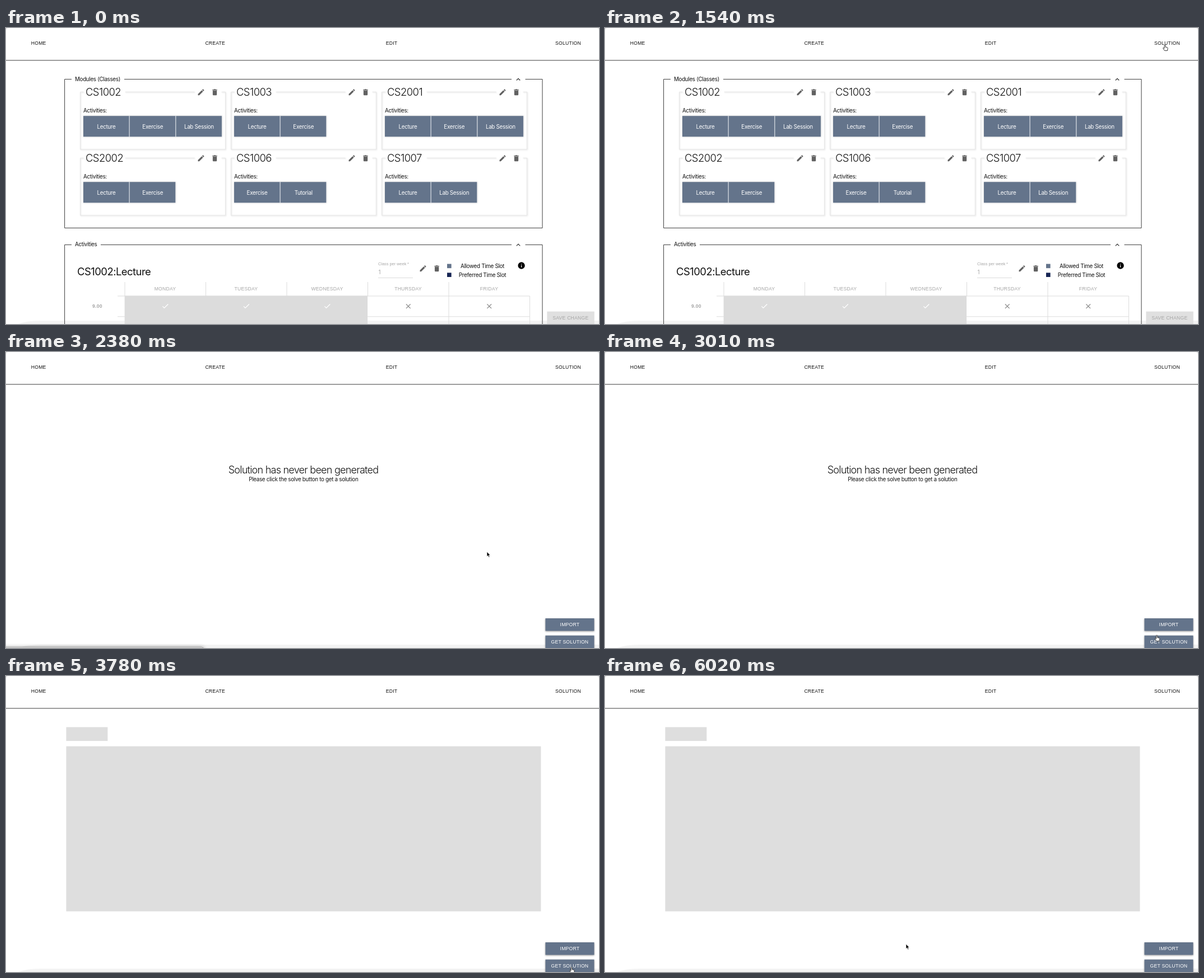
These frames come from a looping animation (1058 by 529 pixels, 8 s). An HTML page:

```html
<!DOCTYPE html>
<html lang="en">
<head>
<meta charset="utf-8">
<title>Timetable planner</title>
<style>
html, body { margin: 0; width: 100%; height: 100%; overflow: hidden; background: #fff; }
svg { display: block; width: 1058px; height: 529px; }
text { font: 9.8px Inter, sans-serif; letter-spacing: -.03em; fill: #111; }
.caps { font: 8.6px "Liberation Sans", Arial, sans-serif; letter-spacing: .0286em; }
.mid { text-anchor: middle; }
.title { font-size: 18.4px; font-weight: 300; letter-spacing: -.5px; }
.head { font-size: 18px; font-weight: 300; letter-spacing: -.75px; }
.label { font: 7.35px "Liberation Sans", Arial, sans-serif; letter-spacing: 0; }
.light { fill: #fff; }
.dim { fill: #a6a6a6; }
.line { fill: none; stroke: #3c3c3c; }
.card { fill: none; stroke: #e4e4e4; filter: drop-shadow(1px 1px 1px #0002); }
.rule { fill: none; stroke: #dcdcdc; }
.raised { filter: drop-shadow(0 1px 1.5px #0006); }
.soft { filter: drop-shadow(0 0 1.5px #0003); }

#edit, #empty, #wait, #actions, #arrow, #hand { animation: 8s step-end infinite; }
#edit { animation-name: edit; }
#empty { animation-name: empty; }
#wait { animation-name: wait; }
#actions { animation-name: actions; }
#arrow { animation-name: arrow; }
#hand { animation-name: hand; }
#status { animation: status 8s step-end infinite; filter: drop-shadow(0 0 3px #0005); }
#cursor { animation: travel 8s step-end infinite; }

@keyframes edit { 0% { opacity: 1 } 20.125%, 100% { opacity: 0 } }
@keyframes empty { 0% { opacity: 0 } 20.125% { opacity: 1 } 47.25%, 100% { opacity: 0 } }
@keyframes wait { 0% { opacity: 0 } 47.25%, 100% { opacity: 1 } }
@keyframes actions { 0% { opacity: 0 } 20.125%, 100% { opacity: 1 } }
@keyframes status {
  0% { opacity: 0 }
  20.125% { opacity: 1 }
  29.75% { opacity: 1; animation-timing-function: steps(2) }
  31.5%, 100% { opacity: 0 }
}
@keyframes arrow {
  0% { opacity: 0 }
  1.75% { opacity: 1 }
  9.625% { opacity: 0 }
  21.875% { opacity: 1 }
  36.75% { opacity: 0 }
  53.375%, 100% { opacity: 1 }
}
@keyframes hand {
  0% { opacity: 0 }
  9.625% { opacity: 1 }
  21.875% { opacity: 0 }
  36.75% { opacity: 1 }
  53.375%, 100% { opacity: 0 }
}
/* Each move runs in 70 ms ticks and rests between moves. */
@keyframes travel {
  0%, 1.75% { transform: translate(536px, 491px) }
  2.625% { transform: translate(690px, 290px) }
  3.5% { transform: translate(777px, 172px) }
  5.25% { transform: translate(777px, 172px); animation-timing-function: steps(3) }
  7.875% { transform: translate(910px, 86px); animation-timing-function: steps(3) }
  10.5% { transform: translate(996px, 23px); animation-timing-function: steps(2) }
  12.25% { transform: translate(999px, 30px) }
  20.125% { transform: translate(999px, 30px); animation-timing-function: steps(2) }
  21.875% { transform: translate(1001px, 9px); animation-timing-function: steps(3) }
  24.5% { transform: translate(940px, 190px); animation-timing-function: steps(3) }
  27.125% { transform: translate(855px, 353px) }
  29.75% { transform: translate(858px, 357px); animation-timing-function: steps(2) }
  31.5% { transform: translate(904px, 463px) }
  33.25% { transform: translate(904px, 463px); animation-timing-function: steps(3) }
  35.875% { transform: translate(960px, 492px); animation-timing-function: steps(4) }
  39.375% { transform: translate(1009px, 520.5px) }
  52.5% { transform: translate(1009px, 520.5px); animation-timing-function: steps(4) }
  56% { transform: translate(729px, 377px) }
  59.5% { transform: translate(729px, 377px); animation-timing-function: steps(4) }
  63% { transform: translate(607px, 442px) }
  64.75% { transform: translate(607px, 442px); animation-timing-function: steps(5) }
  69.125%, 100% { transform: translate(537px, 479px) }
}
</style>
</head>
<body>
<svg viewBox="0 0 1058 529">
  <defs>
    <path id="pen" d="M3 17.25V21h3.75L17.81 9.94l-3.75-3.75zM20.71 7.04c.39-.39.39-1.02 0-1.41l-2.34-2.34c-.39-.39-1.02-.39-1.41 0l-1.83 1.83 3.75 3.75z"/>
    <path id="bin" d="M6 19c0 1.1.9 2 2 2h8c1.1 0 2-.9 2-2V7H6zM19 4h-3.5l-1-1h-5l-1 1H5v2h14z"/>
    <path id="up" d="M12 8l-6 6 1.41 1.41L12 10.83l4.59 4.58L18 14z"/>
    <path id="tick" d="M9 16.17 4.83 12l-1.42 1.41L9 19 21 7l-1.41-1.41z"/>
    <path id="cross" d="M19 6.41 17.59 5 12 10.59 6.41 5 5 6.41 10.59 12 5 17.59 6.41 19 12 13.41 17.59 19 19 17.59 13.41 12z"/>
    <path id="info" d="M12 2C6.48 2 2 6.48 2 12s4.48 10 10 10 10-4.48 10-10S17.52 2 12 2zm1 15h-2v-6h2zm0-8h-2V7h2z"/>
  </defs>
  <path d="M22 529Q36 523 62 523H1058V529Z" fill="#f3f3f3"/>
  <path d="M0 0H5Q0 0 0 5ZM1058 0h-5q5 0 5 5Z" fill="#e6e6e6"/>
  <g id="nav"><path d="M0 57.8H1058" class="line"/></g>
  <g id="edit"></g>
  <g id="empty">
    <text x="530.5" y="217" class="head mid">Solution has never been generated</text>
    <text x="530.8" y="231" class="mid">Please click the solve button to get a solution</text>
  </g>
  <g id="wait" fill="#dedede">
    <rect x="107.4" y="91.4" width="74" height="24.7"/>
    <rect x="107.4" y="125.6" width="847" height="295"/>
  </g>
  <g id="actions"></g>
  <rect id="status" x="-10" y="527.6" width="363" height="20" rx="4" fill="#eee" stroke="#999"/>
  <g id="cursor">
    <path id="arrow" d="M0 0V8.6L2 6.8 3.4 10 4.9 9.3 3.5 6.3H6Z" stroke="#fff" stroke-width=".7"/>
    <path id="hand" d="M-1 1Q-1 0 0 0T1 1V4L4.3 4.9Q5.3 5.2 5.1 6.5L4.4 10.4H-.6L-3.2 6.6Q-3.8 5.4-2.6 5.2L-1 6.4Z" fill="#fff" stroke="#222" stroke-width=".9"/>
  </g>
</svg>
<script>
const slate = '#64748b', ink = '#616161';
const add = (id, html) => document.getElementById(id).insertAdjacentHTML('beforeend', html);
const text = (x, y, s, cls = '') => `<text x="${x}" y="${y}" class="${cls}">${s}</text>`;
const rect = (x, y, w, h, fill, cls = '') =>
  `<rect x="${x}" y="${y}" width="${w}" height="${h}" fill="${fill}" class="${cls}"/>`;
const path = (d, cls) => `<path d="${d}" class="${cls}"/>`;
const icon = (name, x, y, fill = ink) =>
  `<use href="#${name}" fill="${fill}" transform="translate(${x} ${y}) scale(.612) translate(-12 -12)"/>`;

function section(y, bottom, gap, name) {
  return path(`M117 ${y}H104.6V${bottom}H957V${y}H926.5M902 ${y}H${gap}`, 'line') +
    text(123, y + 3, name) + icon('up', 914, y + .3, '#333');
}

function card(x, y, name, acts) {
  const step = 82.7;
  let out = path(`M${x + 6} ${y}H${x}V${y + 102.6}H${x + 259}V${y}H${x + 252}M${x + 204} ${y}H${x + 80}`, 'card');
  out += text(x + 9.4, y + 6.4, name, 'title') + icon('pen', x + 215.5, y + .5) + icon('bin', x + 240, y + .5);
  out += text(x + 5.5, y + 37, 'Activities:');
  out += rect(x + 5.5, y + 42.7, acts.length * step - .6, 37.4, '#dfe3e8', 'soft');
  acts.forEach((act, i) => {
    const left = x + 5.5 + i * step;
    out += rect(left, y + 42.9, step - 1.2, 37, slate) + text(left + 41, y + 65.2, act, 'mid light');
  });
  return out;
}

add('nav', text(44.8, 30.2, 'HOME', 'caps') + text(355.4, 30.2, 'CREATE', 'caps') +
  text(677.8, 30.2, 'EDIT', 'caps') + text(980, 30.2, 'SOLUTION', 'caps'));

const modules = [
  ['CS1002', 'Lecture', 'Exercise', 'Lab Session'],
  ['CS1003', 'Lecture', 'Exercise'],
  ['CS2001', 'Lecture', 'Exercise', 'Lab Session'],
  ['CS2002', 'Lecture', 'Exercise'],
  ['CS1006', 'Exercise', 'Tutorial'],
  ['CS1007', 'Lecture', 'Lab Session']
];
add('edit', section(91.6, 357.4, 211, 'Modules (Classes)') + section(387.4, 540, 169, 'Activities'));
modules.forEach(([name, ...acts], i) =>
  add('edit', card(132.5 + i % 3 * 269, 114.3 + (i > 2) * 118, name, acts)));

add('edit', text(127, 442.4, 'CS1002:Lecture', 'title" style="font-weight:400') +
  text(664, 424.4, 'Class per week', 'label dim') + text(716, 424.4, '*', 'label dim') +
  text(664.5, 440, '1', 'dim') + path('M664 446.5H726', 'rule') +
  icon('pen', 744, 429.8) + icon('bin', 768.6, 429.8) + icon('info', 919.6, 424.6, '#000') +
  rect(787, 421.6, 7.6, 7.6, slate) + text(850, 429, 'Allowed Time Slot', 'mid') +
  rect(787, 437.4, 7.6, 7.6, '#172554') + text(850, 445, 'Preferred Time Slot', 'mid'));

// Timetable grid
const colWidth = 144.5;
add('edit', path('M199 479H934.5V529M199 515.8H934.5M790 479V529', 'rule') +
  rect(211.6, 478.6, colWidth * 3, 51, '#dcdcdc') + text(154, 500.3, '9.00', 'caps dim" style="font-weight:700'));
['MONDAY', 'TUESDAY', 'WEDNESDAY', 'THURSDAY', 'FRIDAY'].forEach((day, i) => {
  const x = 212 + i * colWidth, mid = x + colWidth / 2;
  add('edit', path(`M${x} 454V479`, 'rule') + text(mid - .3, 469.4, day, 'caps mid dim') +
    (i < 3 ? icon('tick', mid, 497, '#fff') : icon('cross', mid, 497.3, '#8a8a8a')));
});
add('edit', rect(965.3, 506.6, 84.4, 30, '#e0e0e0') + text(1007.3, 520.8, 'SAVE CHANGE', 'caps mid dim'));

add('actions', rect(962.4, 476, 87, 22.4, slate, 'raised') + text(1005.9, 490.3, 'IMPORT', 'caps mid light') +
  rect(962.4, 506.7, 87, 22.3, slate, 'raised') + text(1005.9, 520.8, 'GET SOLUTION', 'caps mid light'));
</script>
</body>
</html>
```
